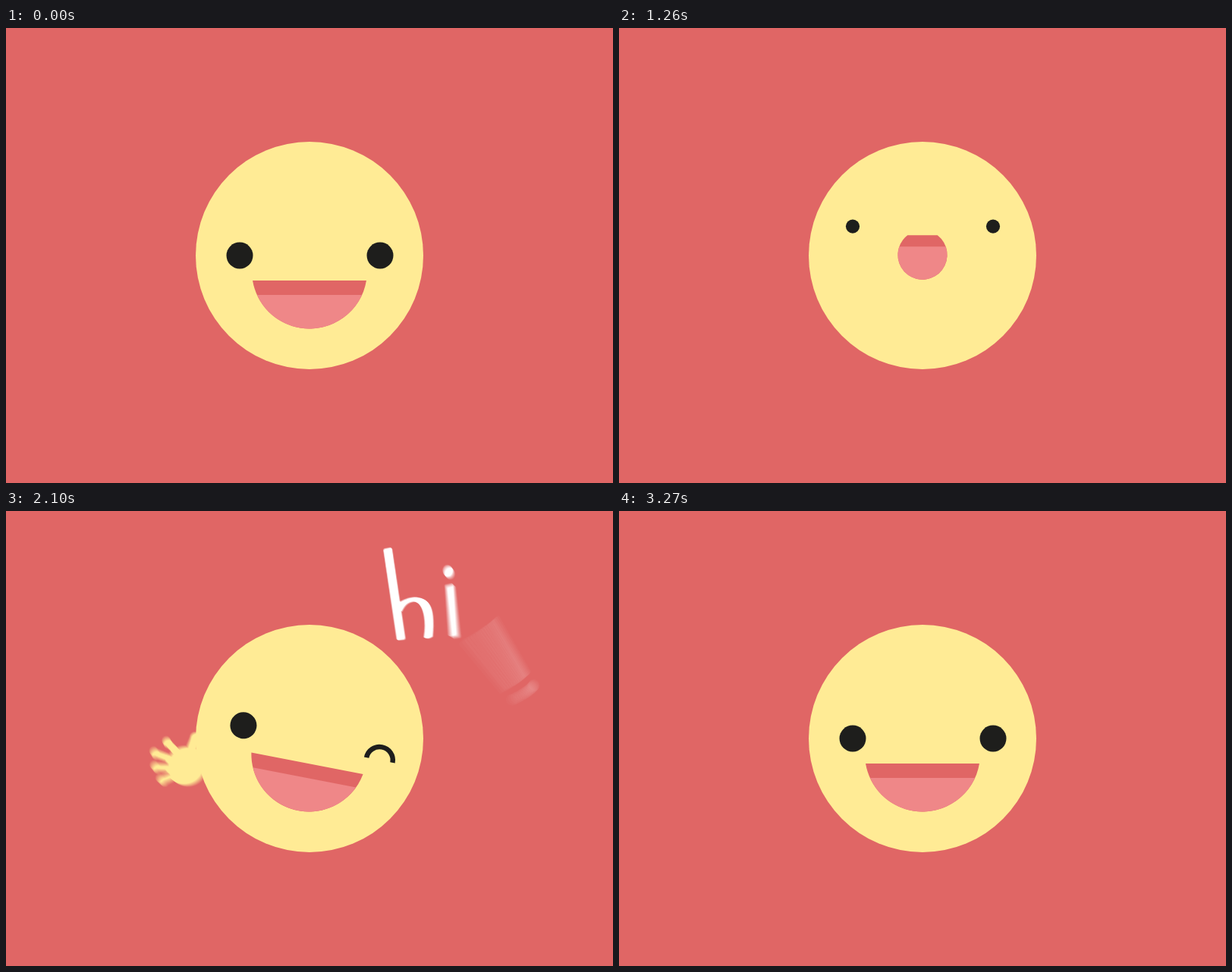
Recreate the animation shown at these times as an HTML page with a canvas. Size 800 by 600 pixels, loop 3660 ms.

```html
<!DOCTYPE html>
<html lang="en">
<head>
<meta charset="utf-8">
<title>Hi!</title>
<style>
html, body { margin: 0; width: 100%; height: 100%; overflow: hidden; background: #e06665; }
canvas { display: block; }
</style>
</head>
<body>
<canvas id="stage" width="800" height="600"></canvas>
<script>
const LOOP = 3660, STEP = 30, SHUTTER = 15, SAMPLES = 16;
const RED = '#e06665', YELLOW = '#ffeb95', PINK = '#ef8788', BLACK = '#1e1e1c', WHITE = '#fff';
const ctx = document.getElementById('stage').getContext('2d');
const layer = makeCanvas(800, 600);

function makeCanvas(w, h) {
  const c = document.createElement('canvas');
  c.width = w;
  c.height = h;
  return c.getContext('2d');
}

const rad = deg => deg * Math.PI / 180;
const lerp = (a, b, p) => a + (b - a) * p;
const clamp = x => Math.min(1, Math.max(0, x));
const part = (t, start, dur) => clamp((t - start) / dur);
const ease = (t, start, dur) => {
  const x = part(t, start, dur);
  return x * x * (3 - 2 * x);
};
const backOut = x => 1 + 2.2 * (x - 1) ** 3 + 1.2 * (x - 1) ** 2;

function turn(c, x, y, deg) {
  c.translate(x, y);
  c.rotate(rad(deg));
  c.translate(-x, -y);
}

function disc(c, x, y, rx, ry = rx) {
  c.beginPath();
  c.ellipse(x, y, rx, ry, 0, 0, 7);
  c.fill();
}

function line(c, x1, y1, x2, y2, width) {
  c.lineWidth = width;
  c.beginPath();
  c.moveTo(x1, y1);
  c.lineTo(x2, y2);
  c.stroke();
}

// Straight pen stroke with slightly rounded corners
function bar(c, x1, y1, x2, y2) {
  c.lineWidth = 5;
  c.beginPath();
  c.moveTo(x1 - 3.3, y1);
  c.lineTo(x1 + 3.3, y1 - .6);
  c.lineTo(x2 + 3.3, y2);
  c.lineTo(x2 - 3.3, y2);
  c.closePath();
  c.fill();
  c.stroke();
}

// White shape drawn once at double size, kept with its place on the stage
function sprite(x, y, w, h, draw) {
  const c = makeCanvas(w * 2, h * 2);
  c.scale(2, 2);
  c.translate(-x, -y);
  c.fillStyle = c.strokeStyle = WHITE;
  c.lineCap = c.lineJoin = 'round';
  draw(c);
  return { x, y, w, h, image: c.canvas };
}
const stamp = (c, s) => c.drawImage(s.image, s.x, s.y, s.w, s.h);

const hand = sprite(150, 220, 105, 90, c => {
  disc(c, 201.5, 275.5, 25.5);
  line(c, 215, 268, 234, 259, 13);
  disc(c, 236.5, 258, 7);
  const fingers = [[206, 264, 205.5, 236], [198, 264, 184, 235], [190, 268, 172, 249], [187, 275, 166, 267]];
  for (const [x1, y1, x2, y2] of fingers) {
    line(c, x1, y1, x2, y2, 9.5);
    disc(c, x2, y2, 5.8);
  }
});

const hShape = new Path2D('M530 126C540 121 550 120 556 122C568 125 573 134 573 148Q573 160 570 175Q564 179 558 175' +
  'Q562 160 561 147C560 132 554 127 549 127C541 127 537 132 533 138L530 138Z');

// x, y: resting centre; cx, cy: bend of the path out; start: time of leaving the head
const letters = [
  { x: 540, y: 115, cx: 590, cy: 190, start: 1910, shape: sprite(505, 45, 80, 140, c => {
    bar(c, 522.3, 56, 528, 173);
    c.fill(hShape);
  }) },
  { x: 592, y: 130, cx: 660, cy: 200, start: 1990, shape: sprite(575, 70, 35, 115, c => {
    bar(c, 594, 107.5, 590, 171);
    disc(c, 595, 87.5, 6.7, 7.7);
  }) },
  { x: 626, y: 115, cx: 790, cy: 230, start: 2070, shape: sprite(605, 55, 42, 130, c => {
    bar(c, 631, 66, 622, 147);
    disc(c, 620.7, 165, 6.9, 7.7);
  }) }
];
const HOME = { x: 460, y: 250 };

function drawHand(c, t) {
  const out = ease(t, 1865, 450) - ease(t, 2799, 450);
  if (out <= 0) return;
  turn(c, 294, 262, -95 * (1 - out));
  stamp(c, hand);
}

function drawLetter(c, t, l) {
  const leave = part(t, 2900, 320) ** 3;
  if (t <= l.start || leave >= 1) return;
  const p = backOut(part(t, l.start, 250)), q = 1 - p;
  let x = q * q * HOME.x + 2 * q * p * l.cx + p * p * l.x;
  let y = q * q * HOME.y + 2 * q * p * l.cy + p * p * l.y;
  x = lerp(x, HOME.x, leave);
  y = lerp(y, HOME.y, leave);
  const swing = 1 - 9 * Math.exp(-Math.max(0, t - 2100) / 190) + 7 * ease(t, 2900, 140);
  c.globalAlpha *= clamp(p);
  turn(c, 528, 175, swing);
  c.translate(x - l.x, y - l.y);
  turn(c, l.x, l.y, -58 * q - 40 * leave);
  stamp(c, l.shape);
}

// Averages several moments of a moving shape and tints the result
function blurred(t, color, draw) {
  layer.clearRect(0, 0, 800, 600);
  layer.globalCompositeOperation = 'lighter';
  for (let i = 0; i < SAMPLES; i++) {
    layer.save();
    layer.globalAlpha = 1 / SAMPLES;
    draw(layer, t + SHUTTER * ((i + .5) / SAMPLES - .5));
    layer.restore();
  }
  layer.globalCompositeOperation = 'source-in';
  layer.fillStyle = color;
  layer.fillRect(0, 0, 800, 600);
  layer.globalCompositeOperation = 'source-over';
  ctx.drawImage(layer.canvas, 0, 0);
}

// Part of the mouth circle below the level y
function bowl(cy, r, y, color) {
  const a = Math.asin(Math.max(-1, Math.min(1, (y - cy) / r)));
  ctx.fillStyle = color;
  ctx.beginPath();
  ctx.arc(400, cy, r, a, Math.PI - a);
  ctx.fill();
}

function drawFace(t) {
  const round = ease(t, 15, 640) - ease(t, 1155, 625);
  const shrink = ease(t, 230, 460);
  const eyeY = 300 - 39 * (shrink - ease(t, 1226, 460));
  const eyeR = 17.5 - 9.5 * (shrink - ease(t, 1163, 460));
  const wink = ease(t, 1820, 240) - ease(t, 2760, 240);

  ctx.fillStyle = YELLOW;
  disc(ctx, 400, 300, 150);
  ctx.save();
  turn(ctx, 400, 317, 11 * wink);

  const mouthY = lerp(320.5, 297.5, round), mouthR = lerp(76, 29, round);
  bowl(mouthY, mouthR, lerp(333, 268.5, round), RED);
  bowl(mouthY, mouthR, lerp(352, 283, round), PINK);

  ctx.fillStyle = ctx.strokeStyle = BLACK;
  disc(ctx, 308, eyeY, eyeR);
  if (wink < .4) {
    disc(ctx, 493, eyeY, eyeR * (1 - 2.5 * wink));
  }
  if (wink > .3) {
    ctx.lineWidth = 6.5;
    ctx.beginPath();
    ctx.arc(492.8, 307 + 3.7 * wink, 17.5 * wink, Math.PI, 0);
    ctx.stroke();
  }
  ctx.restore();
}

function render(t) {
  ctx.fillStyle = RED;
  ctx.fillRect(0, 0, 800, 600);
  if (t > 1800 && t < 3270) {
    blurred(t, YELLOW, drawHand);
    for (const l of letters) blurred(t, WHITE, (c, u) => drawLetter(c, u, l));
  }
  drawFace(t);
}

let begin;
function tick(now) {
  begin ??= now;
  const t = (now - begin) % LOOP;
  render(Math.floor(t / STEP) * STEP);
  requestAnimationFrame(tick);
}
requestAnimationFrame(tick);
</script>
</body>
</html>
```
